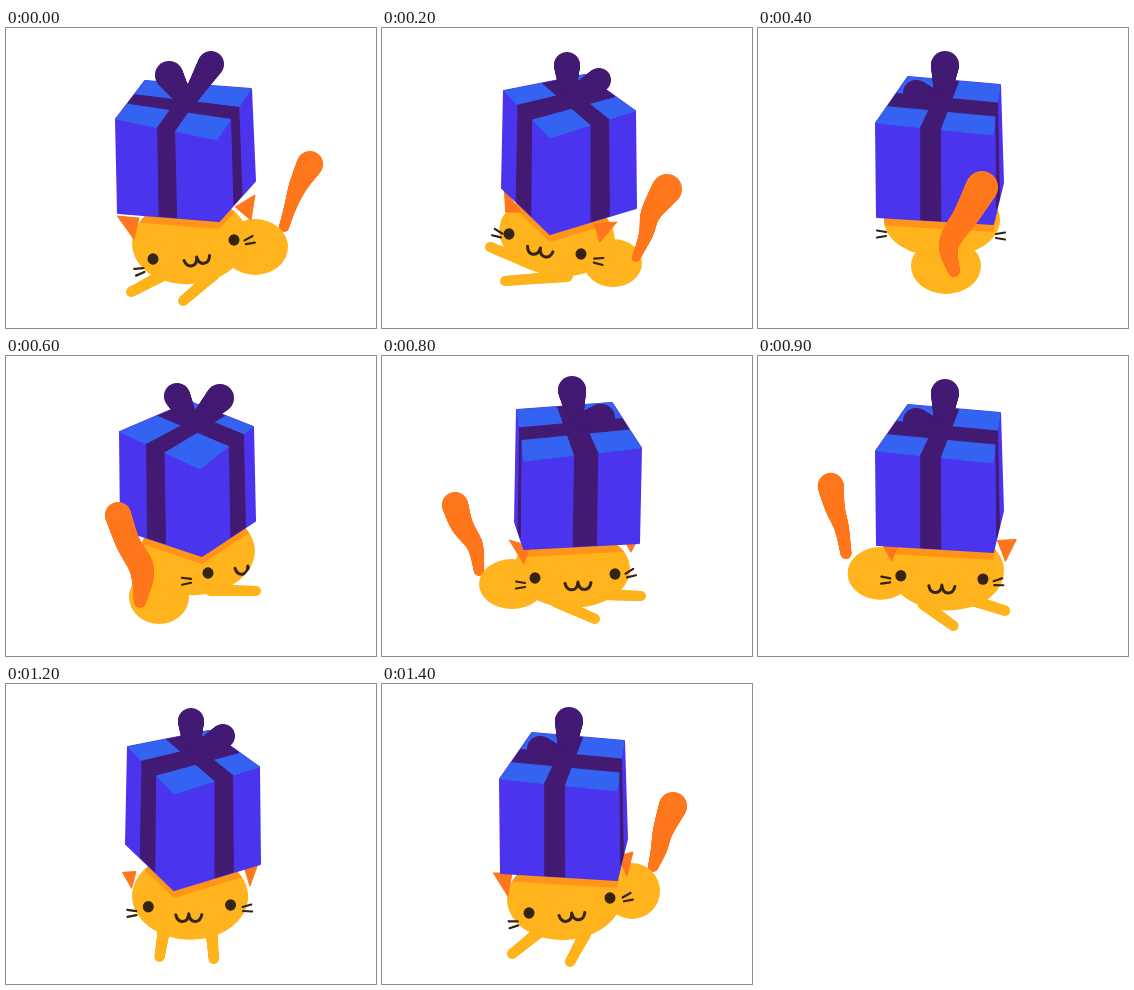
An HTML page with a canvas for the animation above (1500 ms loop, 370x300 px).

```html
<!DOCTYPE html>
<html lang="en">
<head>
<meta charset="utf-8">
<title>Cat carrying a gift</title>
<style>
html, body { margin: 0; height: 100%; overflow: hidden; background: #fff; }
canvas { display: block; }
</style>
</head>
<body>
<canvas id="stage" width="370" height="300"></canvas>
<script>
const ctx = document.getElementById('stage').getContext('2d');
const STEPS = 15, STEP_MS = 100, TURN = 5;
const FUR = '#ffb31c', TAIL = '#ff771c', INK = '#35240f';
const SIDE = '#4b34ee', LID = '#3363f0', RIBBON = '#431a73';

// Pose tracks, keyed by step; steps between keys are interpolated.
const head = { // x, y, ry, rotation
  0: [184, 213, 43, -.1], 2: [175, 207, 41, .15], 4: [184, 192, 37, 0], 6: [191, 197, 42, -.08],
  8: [190, 213, 39, 0], 10: [186, 212, 43, .08], 14: [183, 213, 43, -.08]
};
const body = { // x, y, rx, ry
  0: [249, 219, 33, 28], 2: [231, 235, 29, 24], 4: [188, 238, 35, 28], 6: [153, 241, 30, 27],
  8: [130, 228, 33, 25], 10: [128, 209, 32, 28], 14: [250, 207, 28, 28]
};
const tail = { // four points from base to tip: x, y, r
  0: [278, 199, 5, 284, 180, 6, 292, 158, 9, 304, 136, 13],
  2: [254, 230, 4, 264, 206, 7, 269, 185, 10, 285, 161, 15],
  4: [196, 243, 6, 191, 216, 10, 209, 186, 13, 224, 159, 16],
  6: [134, 246, 6, 136, 214, 12, 122, 187, 12, 112, 159, 13],
  8: [97, 215, 5, 93, 190, 8, 80, 169, 11, 73, 149, 13],
  10: [98, 185, 6, 95, 160, 7, 94, 138, 9, 93, 114, 13],
  14: [271, 183, 5, 277, 165, 8, 281, 147, 10, 291, 122, 14]
};
const paws = { // two limbs: base x, y, tip x, y
  0: [155, 248, 125, 264, 208, 246, 177, 273], 2: [150, 236, 108, 219, 185, 248, 123, 253],
  3: [145, 215, 118, 226, 170, 235, 145, 243], 4: [170, 205, 160, 210, 200, 205, 205, 210],
  5: [210, 218, 240, 228, 200, 215, 205, 220], 6: [205, 234, 250, 235, 220, 215, 225, 220],
  8: [175, 246, 213, 263, 215, 238, 259, 240], 10: [160, 248, 180, 273, 210, 246, 229, 267],
  14: [157, 248, 130, 270, 203, 250, 188, 278]
};
const ears = { // two triangles
  0: [111, 188, 133, 190, 128, 211, 229, 179, 249, 167, 245, 192],
  2: [122, 161, 139, 184, 124, 184, 212, 196, 235, 194, 218, 214],
  4: [130, 160, 140, 160, 140, 180, 200, 160, 220, 160, 210, 180],
  6: [150, 160, 160, 160, 160, 170, 220, 160, 230, 160, 230, 170],
  8: [127, 184, 148, 190, 142, 208, 240, 180, 258, 179, 249, 196],
  10: [122, 187, 133, 187, 128, 198, 236, 185, 255, 184, 244, 209],
  14: [111, 189, 130, 189, 126, 212, 236, 172, 251, 168, 245, 192]
};
const face = { // left eye, right eye, mouth x, y, rotation
  0: [147, 231, 228, 212, 191, 231, -.2], 2: [127, 206, 199, 226, 158, 222, .22],
  3: [85, 200, 150, 213, 117, 207, .2], 4: [60, 195, 300, 195, 320, 195, 0],
  5: [240, 205, 310, 205, 280, 205, -.1], 6: [202, 217, 275, 211, 242, 212, -.1],
  8: [153, 222, 233, 218, 196, 228, -.03], 10: [140, 218, 223, 226, 179, 232, .07],
  14: [147, 229, 228, 214, 190, 231, -.12]
};
const whiskers = { // left and right pair: x, y, angle
  0: [134, 243, -.25, 243, 213, -.33], 2: [116, 206, .4, 216, 233, .1],
  3: [90, 200, .3, 170, 220, .1], 4: [124, 206, 0, 242, 208, 0],
  5: [213, 216, 0, 285, 205, 0], 6: [181, 225, -.05, 290, 210, -.3],
  8: [139, 229, 0, 248, 218, -.4], 10: [124, 221, .05, 238, 232, .05],
  14: [132, 240, -.15, 245, 214, -.35]
};

// Gift poses: lid corners (left, front, right, back), base corners, ribbon spans, bow.
const gifts = [
  { lid: [[110, 91], [211, 112], [245, 61], [139, 53]], base: [[112, 185], [213, 193], [249, 153]],
    span: [.41, .58, .42, .64], bow: [[181, 75], [163, 47, 14], [205, 36, 13]] },
  { lid: [[114, 76], [194, 113], [247, 71], [184, 46]], base: [[115, 173], [196, 200], [249, 165]],
    span: [.33, .55, .55, .82], bow: [[187, 70], [171, 40, 13], [214, 42, 14]] },
  { lid: [[122, 63], [168, 110], [253, 83], [203, 47]], base: [[120, 160], [168, 206], [254, 180]],
    span: [.3, .6, .48, .69], bow: [[186, 70], [185, 37, 13], [217, 52, 12]] },
  { lid: [[135, 54], [142, 105], [259, 92], [230, 47]], base: [[133, 166], [142, 193], [257, 187]],
    span: [.35, .58, .43, .63], bow: [[194, 67], [190, 34, 14], [219, 62, 14]] },
  { lid: [[118, 95], [235, 107], [242, 57], [150, 49]], base: [[119, 189], [235, 196], [245, 155]],
    span: [.38, .55, .38, .64], bow: [[184, 74], [187, 37, 14], [158, 65, 13]] }
];

const lerp = (a, b, t) => a.map((v, i) => v + (b[i] - v) * t);

function hermite(a, b, slopeA, slopeB, t) {
  const u = 1 - t;
  return a * u * u * (1 + 2 * t) + b * t * t * (3 - 2 * t) + slopeA * t * u * u - slopeB * t * t * u;
}

function poseAt(track, step) {
  const times = Object.keys(track).map(Number), n = times.length;
  const i = times.filter(t => t <= step).length - 1;
  const [p, a, b, q] = [-1, 0, 1, 2].map(d => {
    const time = times[(i + d + n) % n];
    return { t: time + STEPS * Math.floor((i + d) / n), v: track[time] };
  });
  const gap = b.t - a.t;
  return a.v.map((v, k) => hermite(v, b.v[k],
    (b.v[k] - p.v[k]) / (b.t - p.t) * gap, (q.v[k] - v) / (q.t - a.t) * gap, (step - a.t) / gap));
}

function poly(points, color, edge = 0) {
  ctx.beginPath();
  points.forEach(p => ctx.lineTo(p[0], p[1]));
  ctx.closePath();
  ctx.fillStyle = ctx.strokeStyle = color;
  ctx.fill();
  ctx.lineWidth = edge;
  if (edge) ctx.stroke();
}

function ellipse(x, y, rx, ry, color, rotation = 0) {
  ctx.beginPath();
  ctx.ellipse(x, y, rx, ry, rotation, 0, 7);
  ctx.fillStyle = color;
  ctx.fill();
}

// Smooth tapered stroke through [x, y, r] points.
function limb(points, color) {
  const at = i => points[Math.max(0, Math.min(points.length - 1, i))];
  for (let i = 0; i < points.length - 1; i++) {
    for (let s = 0; s <= 1; s += 1 / 32) {
      const [x, y, r] = at(i).map((v, k) => hermite(v, at(i + 1)[k],
        (at(i + 1)[k] - at(i - 1)[k]) / 2, (at(i + 2)[k] - v) / 2, s));
      ellipse(x, y, r, r, color);
    }
  }
}

const group = (list, size) =>
  Array.from({ length: list.length / size }, (_, i) => list.slice(i * size, i * size + size));

function drawGift({ lid, base, span, bow }) {
  const [left, front, right, back] = lid, [baseLeft, baseFront, baseRight] = base;
  const [a, b, c, d] = span;
  const band = (p, q, r, s, from, to) =>
    poly([lerp(p, q, from), lerp(p, q, to), lerp(r, s, to), lerp(r, s, from)], RIBBON, 1);
  poly([left, back, right, baseRight, baseFront, baseLeft], SIDE, 2);
  poly(lid, LID, 1);
  band(left, front, baseLeft, baseFront, a, b);
  band(front, right, baseFront, baseRight, c, d);
  band(left, front, back, right, a, b);
  band(front, right, left, back, c, d);
  const knot = [...bow[0], 7];
  limb([knot, bow[1]], RIBBON);
  limb([knot, bow[2]], RIBBON);
}

function drawWhiskers(x, y, angle, side) {
  if (x < 105 || x > 258) return;
  ctx.save();
  ctx.translate(x, y);
  ctx.rotate(angle);
  ctx.scale(side, 1);
  ctx.lineWidth = 2.2;
  ctx.stroke(new Path2D('M-4-2L5-3.5M-4 2L5 3.5'));
  ctx.restore();
}

function drawFace(step) {
  const [ax, ay, bx, by, mx, my, tilt] = poseAt(face, step);
  ellipse(ax, ay, 5.5, 5.7, INK);
  ellipse(bx, by, 5.5, 5.7, INK);
  ctx.translate(mx, my);
  ctx.rotate(tilt);
  ctx.strokeStyle = INK;
  ctx.lineWidth = 3;
  ctx.stroke(new Path2D('M-13-1C-11 8-1 8 0-2C1 8 11 8 13-1'));
}

function draw(step) {
  const gift = gifts[step % TURN];
  const [hx, hy, hry, tilt] = poseAt(head, step);
  const drawTail = () => limb(group(poseAt(tail, step), 3), TAIL);
  const tailInFront = step > 1 && step < 8;
  const clipToHead = paint => {
    ctx.save();
    ctx.beginPath();
    ctx.ellipse(hx, hy, 58, hry, tilt, 0, 7);
    ctx.clip();
    paint();
    ctx.restore();
  };

  ctx.fillStyle = '#fff';
  ctx.fillRect(0, 0, 370, 300);
  ctx.lineJoin = ctx.lineCap = 'round';
  if (!tailInFront) drawTail();
  group(poseAt(paws, step), 4).forEach(([x, y, tx, ty]) => limb([[x, y, 6], [tx, ty, 5]], FUR));
  ellipse(...poseAt(body, step), FUR);
  ellipse(hx, hy, 58, hry, FUR, tilt);
  group(poseAt(ears, step), 6).forEach(ear => poly(group(ear, 2), TAIL, 1));
  clipToHead(() => poly([gift.lid[0], gift.lid[2], ...[...gift.base].reverse().map(([x, y]) => [x, y + 8])],
    'rgba(255, 119, 20, .5)'));
  drawGift(gift);
  clipToHead(() => drawFace(step));
  ctx.strokeStyle = INK;
  const [lx, ly, la, rx, ry, ra] = poseAt(whiskers, step);
  drawWhiskers(lx, ly, la, -1);
  drawWhiskers(rx, ry, ra, 1);
  if (tailInFront) drawTail();
}

const start = performance.now();
function tick() {
  draw(Math.floor((performance.now() - start) / STEP_MS) % STEPS);
  requestAnimationFrame(tick);
}
tick();
</script>
</body>
</html>
```
